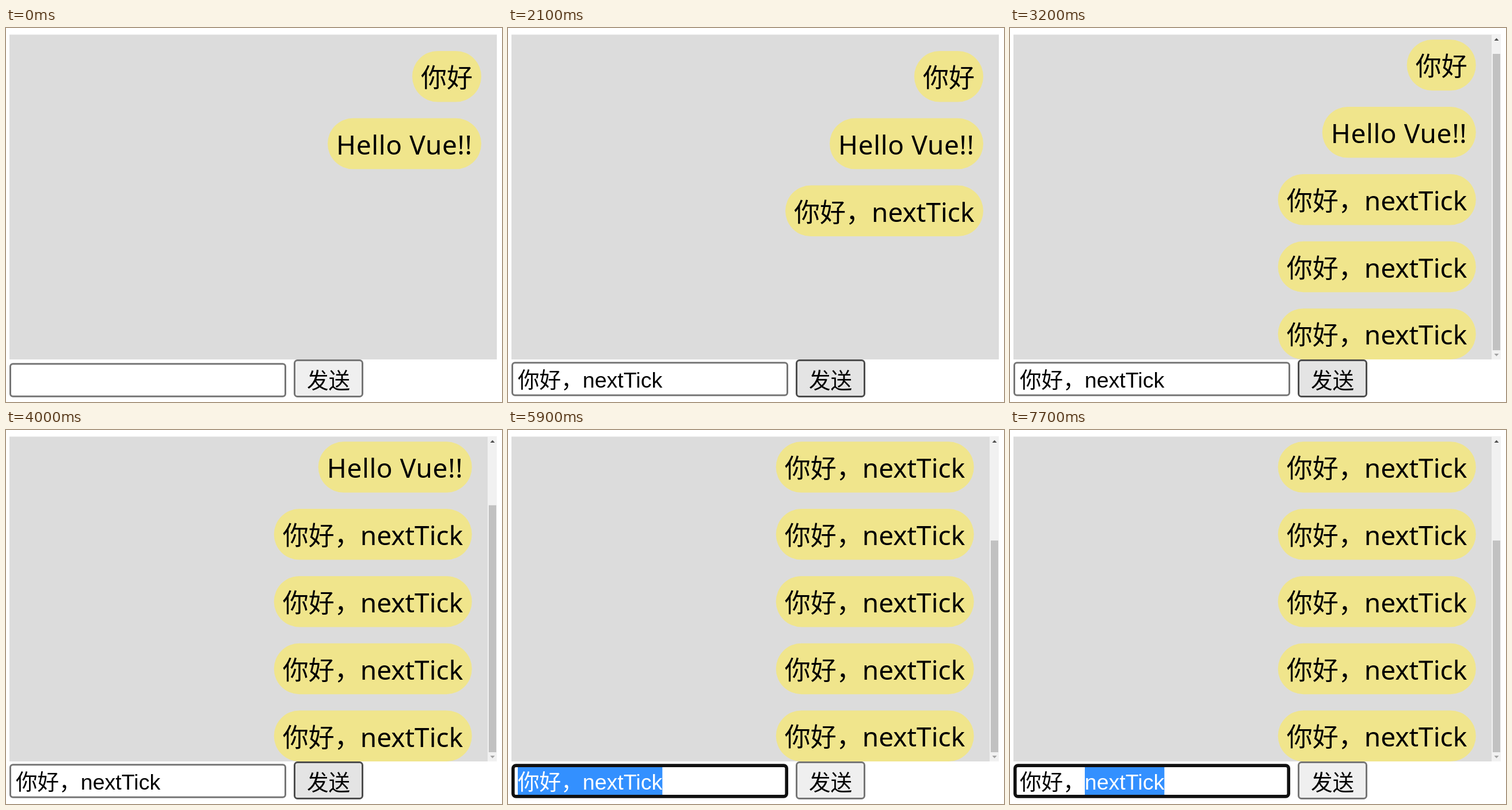
Recreate the animation shown at these times as an HTML page. Size 862x650 px, loop 8 s.

```html
<!DOCTYPE html>
<html lang="zh-CN">
<head>
<meta charset="utf-8">
<style>
html, body { margin: 0; width: 100%; height: 100%; overflow: hidden; background: #fff; }
svg { display: block; }
#chat { font: 45px "Noto Sans CJK SC", sans-serif; }
#chat .latin { font: 46px "Noto Sans", sans-serif; }
#form { font: 37.6px "Liberation Sans", "Noto Sans CJK SC", sans-serif; }
</style>
</head>
<body>
<svg width="862" height="650">
  <defs>
    <clipPath id="view"><rect x="6" y="11.5" width="847" height="564.5"/></clipPath>
    <clipPath id="selClip"><rect id="selBox" y="586" height="48"/></clipPath>
  </defs>
  <rect x="6" y="11.5" width="847" height="564.5" fill="#dcdcdc"/>
  <g id="chat" clip-path="url(#view)"></g>
  <g id="bar">
    <rect x="837" y="11.5" width="16" height="564.5" fill="#f1f1f1"/>
    <rect id="thumb" x="839" width="13" fill="#c1c1c1"/>
    <path d="M841.5 22h8l-4-4.5z" fill="#505050"/>
    <path d="M841.5 566h8l-4 4.5z" fill="#a3a3a3"/>
  </g>
  <g id="form">
    <g id="field">
      <rect id="frame" fill="#fff"/>
      <text id="typed" x="17" y="625">你好，nextTick</text>
      <g clip-path="url(#selClip)">
        <rect x="6" y="580" width="481" height="60" fill="#3390ff"/>
        <text x="17" y="625" fill="#fff">你好，nextTick</text>
      </g>
      <rect id="caret" y="590.5" width="1.4" height="41"/>
    </g>
    <rect id="button" x="501.5" y="577.5" width="118" height="63" rx="5" stroke-width="3"/>
    <text x="523" y="626">发送</text>
  </g>
</svg>
<script>
const LOOP = 8000, PITCH = 116.8, TEXT_END = 268.3;
const $ = id => document.getElementById(id);
const set = (el, attrs) => { for (const k in attrs) el.setAttribute(k, attrs[k]); };
const show = (el, on) => { el.style.display = on ? "" : "none"; };

// Each step changes only the listed properties.
const steps = [
  [0, { count: 2, text: false, focus: false, over: false, button: "idle", caret: 0, sel: 0 }],
  [200, { over: true }],
  [600, { focus: true, caret: 17 }],
  [1100, { caret: 0 }],
  [1300, { text: true, caret: TEXT_END }],
  [1700, { over: false, button: "hover" }],
  [1800, { caret: 0 }],
  [1900, { focus: false, button: "down" }],
  [2100, { count: 3, button: "hover" }],
  [2500, { button: "down" }],
  [2700, { count: 4, button: "hover" }],
  [3100, { button: "down" }],
  [3200, { count: 5, button: "hover" }],
  [3900, { button: "down" }],
  [4000, { count: 6, button: "hover" }],
  [5000, { count: 7 }],
  [5400, { button: "idle", over: true }],
  [5800, { focus: true, caret: TEXT_END }],
  [5900, { caret: 0, sel: 17 }],
  [7000, { sel: 0, caret: TEXT_END }],
  [7500, { caret: 0, sel: 249 }],
  [7600, { sel: 190 }],
  [7700, { sel: 130 }]
];

const buttonLook = {
  idle: { fill: "#efefef", stroke: "#767676" },
  hover: { fill: "#e4e4e4", stroke: "#4d4d4d" },
  down: { fill: "#f5f5f5", stroke: "#8d8d8d" }
};

const greeting = { width: 120, html: "你好" };
const hello = { width: 267, html: '<tspan class="latin" letter-spacing=".6">Hello Vue!!</tspan>' };
const tick = { width: 344, html: '你好，<tspan class="latin">nextTick</tspan>' };
const messages = [greeting, hello, tick, tick, tick, tick, tick];

$("chat").innerHTML = messages.map(({ width, html }, i) => {
  const x = 826 - width, y = 40 + PITCH * i;
  return `<g><rect x="${x}" y="${y}" width="${width}" height="88.5" rx="44.25" fill="#f0e58c"/>
    <text x="${x + 15}" y="${y + 63}">${html}</text></g>`;
}).join("");
const bubbles = [...$("chat").children];

function drawChat(count) {
  const scrolls = count > 4;
  const offset = scrolls ? 19.7 + (count - 5) * PITCH : 0;
  bubbles.forEach((b, i) => {
    show(b, i < count);
    set(b, { transform: `translate(${scrolls ? -16.3 : 0} ${-offset})` });
  });
  show($("bar"), scrolls);
  const size = 533 * 564.5 / (564.5 + offset);
  set($("thumb"), { y: 560 - size, height: size });
}

function drawField({ text, focus, over, caret, sel }) {
  const line = focus ? 5.6 : 3;
  set($("field"), { transform: `translate(0 ${text ? 0 : 2})` });
  set($("frame"), {
    x: 6 + line / 2, y: 580.3 + line / 2, width: 481 - line, height: 59.4 - line,
    rx: focus ? 5 : 4.5, "stroke-width": line,
    stroke: focus ? "#101010" : over ? "#4d4d4d" : "#767676"
  });
  show($("typed"), text);
  show($("caret"), caret);
  set($("caret"), { x: caret });
  set($("selBox"), { x: sel, width: sel ? TEXT_END - sel : 0 });
}

function draw(now) {
  const t = now % LOOP;
  const state = Object.assign({}, ...steps.filter(s => s[0] <= t).map(s => s[1]));
  drawChat(state.count);
  drawField(state);
  set($("button"), buttonLook[state.button]);
}

const start = performance.now();
function loop() {
  draw(performance.now() - start);
  requestAnimationFrame(loop);
}
loop();
</script>
</body>
</html>
```
